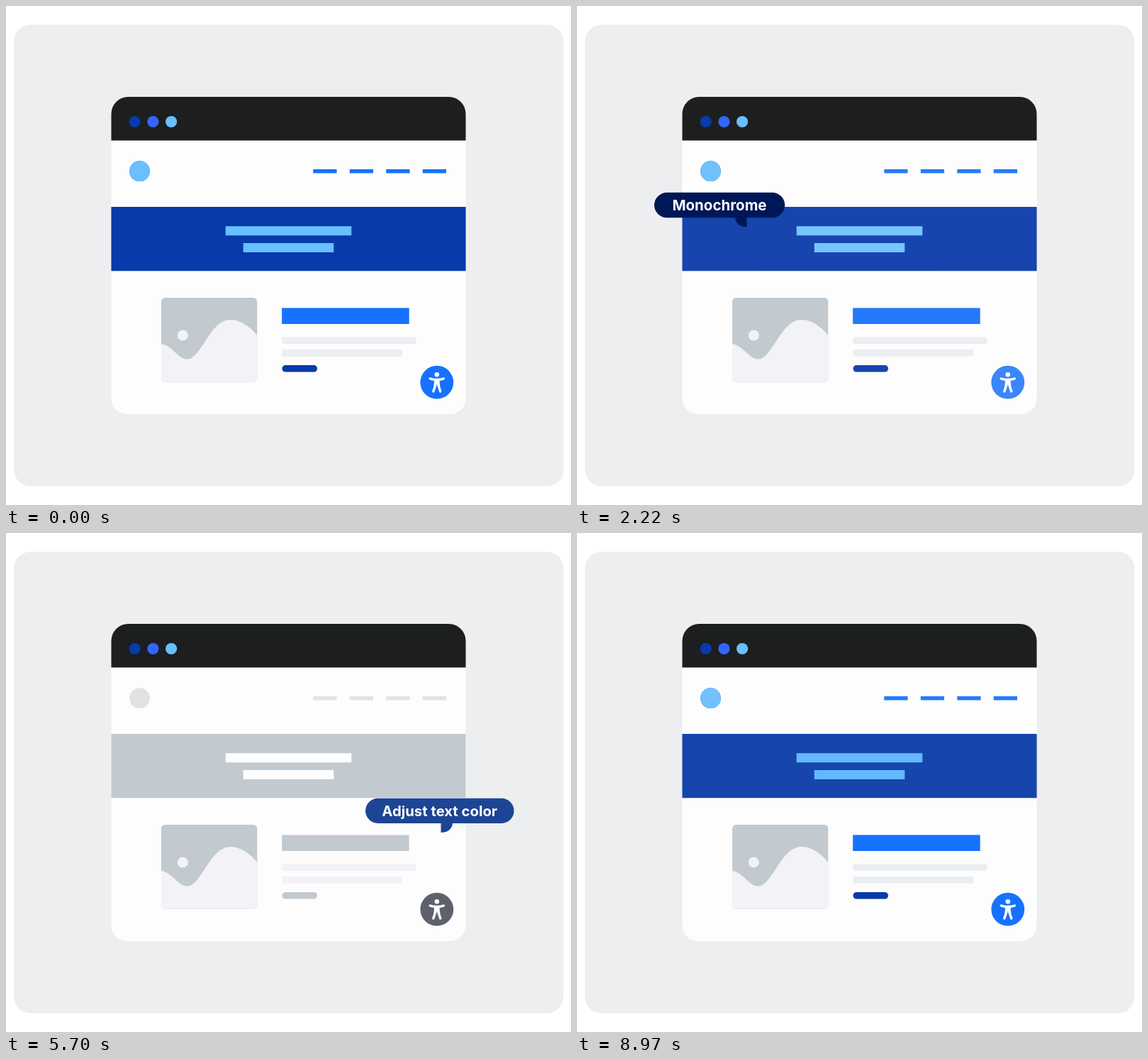
Recreate the animation shown at these times as an HTML page. Size 797x703 px, loop 9000 ms.

```html
<!DOCTYPE html>
<html lang="en">
<head>
<meta charset="utf-8">
<title>Accessible page</title>
<style>
  html, body { margin: 0; width: 100%; height: 100%; overflow: hidden; background: #fff; }
  svg { display: block; width: 100vw; height: 100vh; }
  text { font: 700 20.5px Inter, sans-serif; fill: #fff; text-anchor: middle; }
</style>
</head>
<body>
<svg viewBox="0 0 797 703">
  <defs>
    <clipPath id="frame"><rect x="219" y="411" width="135.3" height="118.5" rx="5.5"/></clipPath>
    <g id="nav">
      <circle cx="188.5" cy="232.7" r="14.4"/>
      <path d="M433.3 230h33.2v5.4h-33.2zm51.5 0H518v5.4h-33.2zm51.5 0h33.2v5.4h-33.2zm51.5 0H621v5.4h-33.2z"/>
    </g>
    <path id="banner" d="M148.5 283h500v90.3h-500z"/>
    <path id="titles" d="M309.7 310.2h177.6v13H309.7zM334.7 334h127.6v13H334.7z"/>
    <path id="heading" d="M389.2 425.5h179.4V448H389.2z"/>
    <path id="lines" d="M389.5 466.5h188.7v9.4H389.5zm0 17.6h169.6v9.4H389.5z"/>
    <rect id="button" x="389.5" y="506" width="49.5" height="9.6" rx="4.8"/>
  </defs>

  <rect x="11.3" y="26.5" width="775" height="650" rx="23" fill="#edeef0"/>
  <path d="M148.5 189h500v364a22 22 0 0 1-22 22h-456a22 22 0 0 1-22-22z" fill="#fdfdfd"/>
  <path d="M148.5 189.6V152a24 24 0 0 1 24-24h452a24 24 0 0 1 24 24v37.6z" fill="#1c1e1f"/>
  <circle cx="181.7" cy="163" r="8.1" fill="#083aaa"/>
  <circle cx="207.4" cy="163" r="8.1" fill="#3366ff"/>
  <circle cx="233.1" cy="163" r="8.1" fill="#69bfff"/>

  <g clip-path="url(#frame)">
    <path d="M219 411h136v119H219z" fill="#c2c9cf"/>
    <g fill="#f2f2f7">
      <circle cx="249.3" cy="464" r="7.6"/>
      <path d="M219 476C234 478 243 497.5 255.500 497.500C276 497.500 287 442 317 442C331 442 346 453 355 465V530H219z"/>
    </g>
  </g>

  <!-- Monochrome page, with the coloured layers above it -->
  <use href="#nav" fill="#e2e2e2"/>
  <g fill="#c2c9cf"><use href="#banner"/><use href="#heading"/><use href="#button"/></g>
  <use href="#titles" fill="#fdfdfd"/>
  <use href="#lines" fill="#f2f2f7"/>
  <use id="recolor" href="#titles" fill="#3366ff"/>
  <g id="header">
    <use href="#nav" fill="#1672ff"/>
    <circle cx="188.5" cy="232.7" r="14.4" fill="#69bfff"/>
    <use href="#banner" fill="#083aaa"/>
    <use href="#titles" fill="#69bfff"/>
  </g>
  <g id="content">
    <use href="#heading" fill="#1672ff"/>
    <use href="#lines" fill="#ebeef2"/>
    <use href="#button" fill="#083aaa"/>
  </g>

  <g id="widget">
    <circle id="grayDisc" cx="607.8" cy="530.2" r="23.4" fill="#5e616d"/>
    <circle id="blueDisc" cx="607.8" cy="530.2" r="23.4" fill="#1672ff"/>
    <circle cx="607.8" cy="519.2" r="3.3" fill="#fff"/>
    <path d="M598.300 525C603 527 612.600 527 617.300 525M605.800 534L602.800 543M609.800 534L612.800 543" fill="none" stroke="#fff" stroke-width="3.400" stroke-linecap="round"/>
    <path d="M603.900 526h7.800v5l.7 5-2.800-.7-1.800-2.300-1.800 2.300-2.800.7.700-5z" fill="#fff"/>
  </g>

  <g id="mono" fill="#001757">
    <rect x="109" y="262.800" width="184.200" height="35.500" rx="17.750"/>
    <path d="M223 297h16.500v14.200C229 311.200 223 305.500 223 297z"/>
    <text x="201" y="288.300">Monochrome</text>
  </g>
  <g id="adjust" fill="#1c4595">
    <rect x="505.900" y="373.300" width="211.800" height="35.500" rx="17.750"/>
    <path d="M613.500 407.500h16.700C630.200 416 624 422 613.500 422z"/>
    <text x="611.700" y="398.800">Adjust text color</text>
  </g>

  <g id="hand" fill="#fff" stroke="#55575c" stroke-width="1.200" stroke-linejoin="round" stroke-linecap="round">
    <path d="M614.300 541a2.900 2.900 0 0 1 5.800 0v5.500c1-1.800 4.500-1.500 5 .8 1.200-1.600 4.300-1 4.700 1 1.600-1.200 5-.4 5.200 3V564c0 8-4 12.300-11 12.300-6 0-8-2.300-12-7.300l-6.500-6.500c-3-3.500.5-7 4.300-4.800l4.500 3.500z"/>
    <path d="M620.100 546.500v8.500m5-7.700v8.200m4.700-7.200v7.700" fill="none"/>
  </g>
</svg>
<script>
const LOOP = 9000;
const $ = id => document.getElementById(id);
const linear = (t, a, b) => Math.min(1, Math.max(0, (t - a) / (b - a)));
const ease = (t, a, b) => (1 - Math.cos(Math.PI * linear(t, a, b))) / 2;
const fade = (id, value) => $(id).setAttribute('opacity', value);
const place = (id, transform) => $(id).setAttribute('transform', transform);
const scaleAt = (id, x, y, s) =>
  place(id, `translate(${x} ${y}) scale(${s}) translate(${-x} ${-y})`);

function draw(t) {
  const recolor = ease(t, 5820, 6480);
  const blue = 1 - linear(t, 2100, 2760) + recolor;
  fade('header', 1 - ease(t, 2100, 2760) + ease(t, 8430, 9090));
  fade('content', 1 - ease(t, 2100, 2760) + recolor);
  fade('recolor', recolor);
  fade('blueDisc', blue);
  fade('grayDisc', 1 - blue);

  const press = ease(t, 790, 980) - ease(t, 1000, 1190);
  scaleAt('widget', 607.8, 530.2, 1 - 0.25 * press);

  scaleAt('mono', 239.5, 311, ease(t, 1000, 1720) - ease(t, 3960, 4600));
  scaleAt('adjust', 613.5, 422, ease(t, 4860, 5760) - ease(t, 7530, 8340));

  // The hand enters and leaves along one curve
  const away = 1 - ease(t, 30, 600) + ease(t, 1410, 2000);
  const bend = 2 * away * (1 - away), end = away * away;
  place('hand', `translate(${140 * bend + 121 * end} ${45 * bend + 175 * end})`);
}

const start = performance.now();
function tick() {
  draw((performance.now() - start) % LOOP);
  requestAnimationFrame(tick);
}
tick();
</script>
</body>
</html>
```
